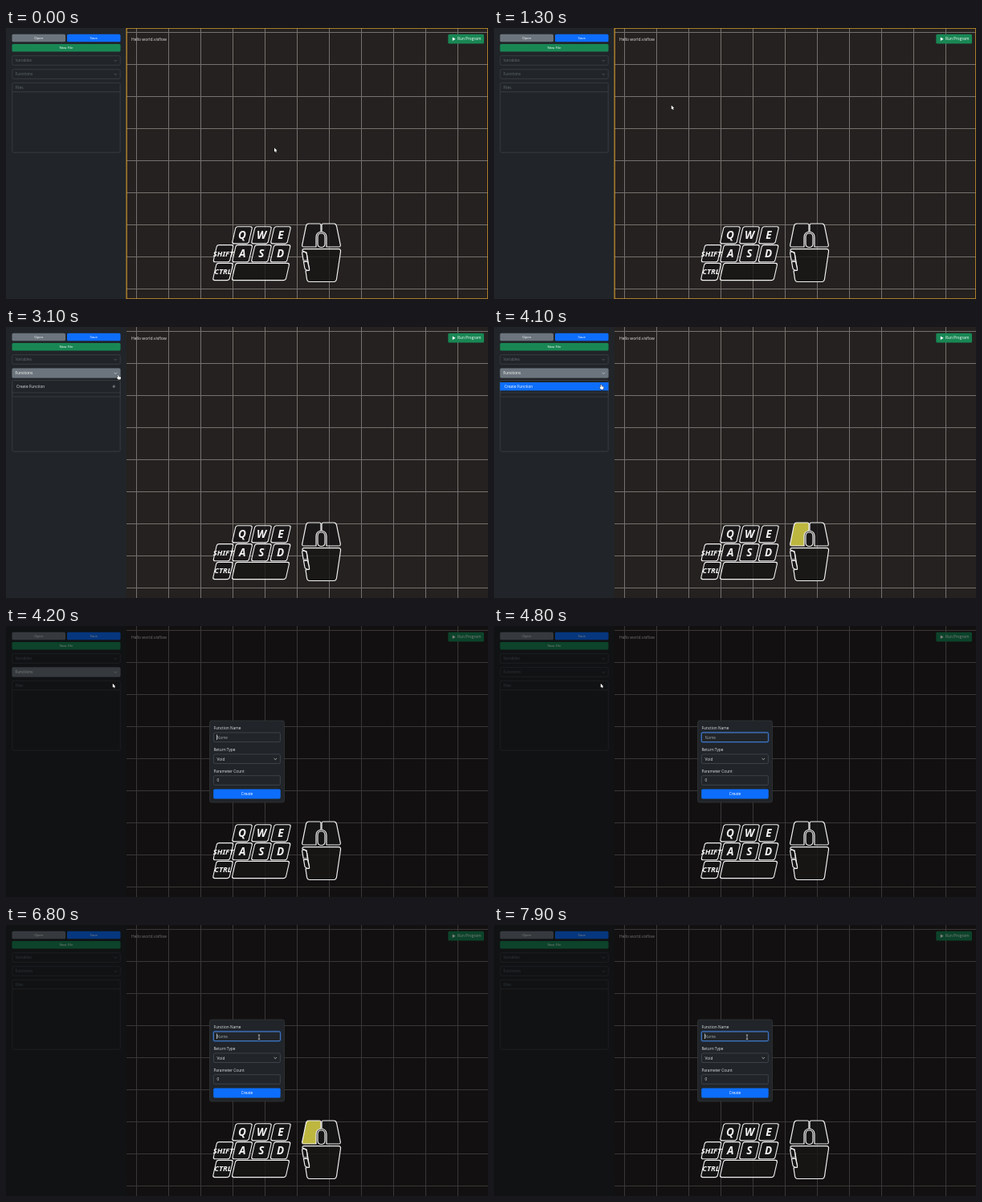
An HTML page with a canvas that plays this animation: 600 px wide and 338 px high, repeating every 8 s.

```html
<!DOCTYPE html>
<html lang="en">
<head>
<meta charset="utf-8">
<title>Create function dialog</title>
<style>
  html, body { margin: 0; width: 100%; height: 100%; overflow: hidden; background: #212529; }
  canvas { display: block; width: 600px; height: 338px; }
</style>
</head>
<body>
<canvas id="stage" width="600" height="338"></canvas>
<script>
const ctx = document.getElementById('stage').getContext('2d');
const LOOP = 8000, STEP = 100;
const UI_FONT = '"Open Sans", "Noto Sans", sans-serif';
const KEY_FONT = '"Noto Sans", "Open Sans", sans-serif';
const PANEL = '#212529', GRAY = '#6c757d', BLUE = '#0d6efd', GREEN = '#198754';
const LINE = '#41464b', DIM_TEXT = '#636b73', LIGHT = '#dee2e6';

const progress = (t, from, to) => Math.min(1, Math.max(0, (t - from) / (to - from)));
const within = (t, from, to) => t >= from && t < to;
const smooth = p => p * p * (3 - 2 * p);

function box(x, y, w, h, fill, stroke, radius = 1.6, lineWidth = 0.7) {
  ctx.beginPath();
  ctx.roundRect(x, y, w, h, radius);
  if (fill) { ctx.fillStyle = fill; ctx.fill(); }
  if (stroke) { ctx.strokeStyle = stroke; ctx.lineWidth = lineWidth; ctx.stroke(); }
}

function label(text, x, y, color = '#fff', size = 4.8, align = 'left') {
  ctx.font = `${size}px ${UI_FONT}`;
  ctx.textAlign = align;
  ctx.textBaseline = 'alphabetic';
  ctx.fillStyle = color;
  ctx.fillText(text, x, y + size * 0.36);
}

function stroke(d, color, width) {
  ctx.strokeStyle = color;
  ctx.lineWidth = width;
  ctx.stroke(new Path2D(d));
}

const chevron = (x, y, color) => stroke(`M${x - 1.7} ${y - 0.8}l1.7 1.7l1.7 -1.7`, color, 0.7);

function button(text, x, y, w, h, fill, size) {
  box(x, y, w, h, fill);
  label(text, x + w / 2, y + h / 2, '#fff', size, 'center');
}

function dropdownButton(text, y, active) {
  box(7.8, y, 134.4, 11.6, null, LINE);
  label(text, 11.6, y + 5.9, DIM_TEXT);
  chevron(136.3, y + 5.9, DIM_TEXT);
  if (!active) return;
  ctx.globalAlpha = active;
  box(7.5, y - 0.3, 135, 12.2, GRAY);
  label(text, 11.6, y + 5.9);
  chevron(136.3, y + 5.9, '#d5d8da');
  ctx.globalAlpha = 1;
}

function drawSidebar(t) {
  ctx.fillStyle = PANEL;
  ctx.fillRect(0, 0, 150, 338);
  button('Open', 7.5, 7.8, 66.5, 9.5, GRAY, 4.35);
  button('Save', 76, 7.8, 66.5, 9.5, BLUE, 4.35);
  button('New File', 7.5, 20, 135, 9.5, GREEN, 4.35);
  dropdownButton('Variables', 34.7, 0);
  dropdownButton('Functions', 51.7, progress(t, 1700, 1950) * (1 - progress(t, 4200, 4450)));

  box(7.8, 68.4, 134.4, 86.8, null, LINE);
  ctx.fillStyle = LINE;
  ctx.fillRect(8, 79.4, 134, 0.7);
  label('Files', 11.6, 74.3, DIM_TEXT);

  if (within(t, 2500, 4200)) {
    box(7.8, 66.5, 134.4, 20.5, PANEL, LINE);
    ctx.fillStyle = LINE;
    ctx.fillRect(8, 81.6, 134, 0.6);
    if (t >= 3400) {
      ctx.fillStyle = BLUE;
      ctx.fillRect(7.5, 69, 135, 10.3);
    }
    label('Create Function', 13, 74.2, t >= 3400 ? '#fff' : LIGHT);
    stroke('M132.3 74.2h4M134.3 72.2v4', '#adb5bd', 0.6);
  }
}

function drawWorkspace(t) {
  ctx.fillStyle = '#252120';
  ctx.fillRect(150, 0, 450, 338);
  ctx.fillStyle = '#75716e';
  for (let x = 162; x < 600; x += 40) ctx.fillRect(x, 0, 1, 338);
  for (let y = 5; y < 338; y += 40) ctx.fillRect(150, y, 450, 1);
  if (t < 2300) box(150, 0.3, 449.7, 337.4, null, '#c8922e', 0, 1);
  label('Hello world.visflow', 156, 13.8, '#e4e4e4', 5);
  box(550.3, 7.8, 44.7, 11.7, GREEN);
  ctx.fillStyle = '#fff';
  ctx.fill(new Path2D('M555.8 11.5l3.8 2.3l-3.8 2.3z'));
  label('Run Program', 562, 13.7);
}

function field(text, title, y, color = LIGHT) {
  label(title, 258.4, y - 5.9, LIGHT);
  box(258.4, y, 83, 11.6, PANEL, '#495057');
  label(text, 262.6, y + 6, color);
}

function drawDialog(t) {
  ctx.fillStyle = 'rgba(0,0,0,.5)';
  ctx.fillRect(0, 0, 600, 338);
  box(253.5, 118, 93, 102, PANEL, '#34383c', 2.5);
  field('Name', 'Function Name', 133, '#9a9fa4');
  field('Void', 'Return Type', 159.9);
  field('0', 'Parameter Count', 186.7);
  chevron(335.3, 165.8, LIGHT);
  button('Create', 258.2, 203.6, 83.5, 11.8, BLUE);

  ctx.globalAlpha = progress(t, 4200, 4400);
  box(257.9, 132.5, 84, 12.6, null, 'rgba(13,110,253,.35)', 2, 1.4);
  box(258.4, 133, 83, 11.6, null, '#4f86d6', 1.6, 0.8);
  ctx.globalAlpha = 1;

  const caretHidden = [[4800, 5300], [5800, 6300], [7400, 7900]].some(([a, b]) => within(t, a, b));
  if (!caretHidden) {
    ctx.fillStyle = '#e9ecef';
    ctx.fillRect(262, 135.5, 0.7, 6.5);
  }
  if (within(t, 5500, 6800)) {
    box(327.7, 148.6, 42.6, 7.4, '#fff', '#888', 0, 0.5);
    label('Please fill out this field.', 330, 152.3, '#555', 3.6);
  }
}

function key(text, cx, cy, w = 20.5) {
  ctx.save();
  ctx.translate(cx, cy);
  ctx.save();
  ctx.transform(1, 0, -0.23, 1, 0, 0);
  box(-w / 2, -10.6, w, 21.2, 'rgba(24,22,22,.8)', '#f2f2f2', 2.6, 1.1);
  ctx.restore();
  const size = text.length > 1 ? 9.5 : 13.5;
  ctx.font = `italic 600 extra-condensed ${size}px ${KEY_FONT}`;
  ctx.textAlign = 'center';
  ctx.textBaseline = 'alphabetic';
  ctx.fillStyle = '#f4f4f4';
  ctx.fillText(text, 0, size * 0.36);
  ctx.restore();
}

function mousePart(d, fill = 'rgba(24,22,22,.8)') {
  const path = new Path2D(d);
  ctx.fillStyle = fill;
  ctx.fill(path);
  ctx.strokeStyle = '#f2f2f2';
  ctx.lineWidth = 1.2;
  ctx.stroke(path);
}

function drawInputs(t) {
  [...'QWE'].forEach((c, i) => key(c, 294 + i * 24, 258.3));
  ['SHIFT', ...'ASD'].forEach((c, i) => key(c, 270.5 + i * 23.7, 281.2));
  key('CTRL', 270, 304);
  key('', 317, 304, 67);

  const pressed = [2300, 4000, 6800].some(start => within(t, start, start + 200));
  const sideButton = 'M386 273H371Q368 273 368.8 270L373.5 247Q374.2 244 377 244H390Q392 244 392 246V254Q386 255 386 261Z';
  mousePart(sideButton, pressed ? '#bdb740' : undefined);
  ctx.save();
  ctx.translate(785, 0);
  ctx.scale(-1, 1);
  mousePart(sideButton);
  ctx.restore();
  mousePart('M388 261Q388 256 392.5 256T397 261V269Q397 273.5 392.5 273.5T388 269Z');
  mousePart('M371 275.7H414Q417 275.7 416.5 279L411.5 313Q411 316.5 408 316.5H378Q375 316.5 374.5 313L373 303L377.5 302L376 291L374 280L369 278Q368.5 275.7 371 275.7Z');
  mousePart('M370 279L373 280Q374.3 281 374.5 283L375.3 290H370.2L368.7 281Q368.6 279 370 279Z');
  mousePart('M370.5 291.5H375.5L377.5 300Q378 302.5 376 302.5L373.5 301.5Q372 301 371.8 299Z');
}

// Waypoints: time, x, y of the pointer's hot spot.
const POINTER = [
  [800, 334, 149.5], [1700, 139.8, 58.6],
  [3000, 139.8, 58.6], [3600, 132.8, 71.8],
  [4900, 132.8, 71.8], [5400, 314, 143],
  [5900, 314, 143], [6000, 334, 139.5], [6100, 315, 139.8]
];

function pointerAt(t) {
  const next = POINTER.findIndex(([time]) => time > t);
  if (next === 0) return POINTER[0].slice(1);
  if (next < 0) return POINTER.at(-1).slice(1);
  const [t0, x0, y0] = POINTER[next - 1], [t1, x1, y1] = POINTER[next];
  const p = smooth(progress(t, t0, t1));
  return [x0 + (x1 - x0) * p, y0 + (y1 - y0) * p];
}

function drawPointer(t) {
  const [x, y] = pointerAt(t);
  ctx.save();
  ctx.translate(x, y);
  if (t >= 5400) {
    stroke('M-1.2 -2.7H1.2M0 -2.7V2.7M-1.2 2.7H1.2', '#d8d8d8', 0.7);
  } else {
    const hand = within(t, 1700, 4200);
    const shape = new Path2D(hand
      ? 'M0 0Q.7 -.3 1 .4V2.2L3.2 2.7Q3.9 3 3.7 4L3.2 6H.3L-1.4 3.6Q-1.2 2.8 -.2 3.4Z'
      : 'M0 0V5L1.2 4L2 5.7L2.9 5.3L2.1 3.6H3.6Z');
    ctx.strokeStyle = '#111';
    ctx.lineWidth = 0.8;
    ctx.stroke(shape);
    ctx.fillStyle = '#fff';
    ctx.fill(shape);
  }
  ctx.restore();
}

function render(now) {
  const t = Math.floor((now % LOOP) / STEP) * STEP;
  drawWorkspace(t);
  drawSidebar(t);
  if (t < 2300) {
    ctx.fillStyle = '#c8922e';
    ctx.fillRect(149.5, 0, 1, 338);
  }
  if (t >= 4200) drawDialog(t);
  drawInputs(t);
  drawPointer(t);
  requestAnimationFrame(render);
}
requestAnimationFrame(render);
</script>
</body>
</html>
```
